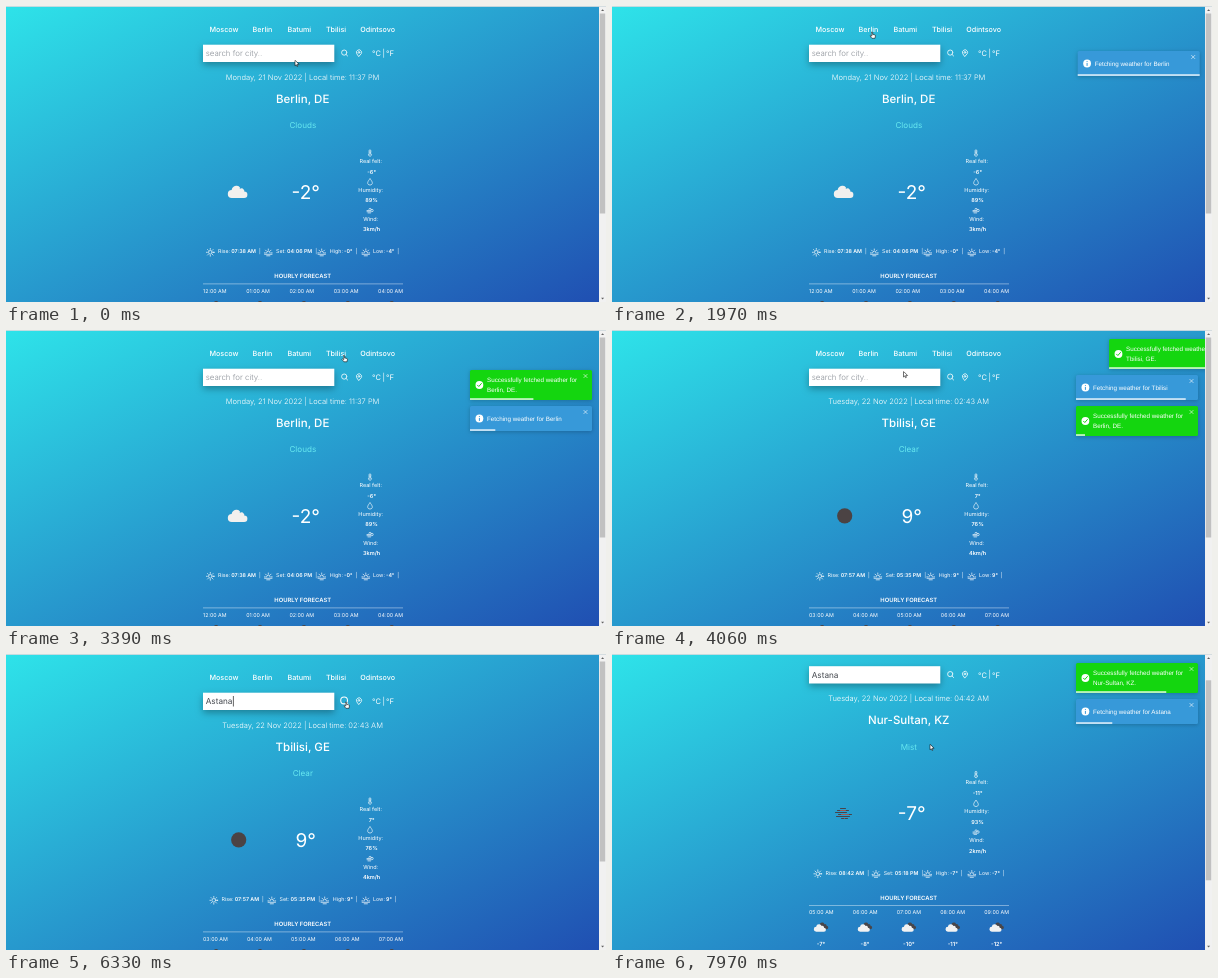
These frames come from a looping animation (600x296 px, 8000 ms). An HTML page with a canvas:

```html
<!DOCTYPE html>
<html lang="en">
<head>
<meta charset="utf-8">
<title>Weather app</title>
<style>
  html, body { margin: 0; width: 100%; height: 100%; overflow: hidden; background: #2798cd; }
  canvas { display: block; width: 600px; height: 296px; }
</style>
</head>
<body>
<canvas id="stage"></canvas>
<script>
const W = 600, H = 296, PAGE_W = 593, LOOP = 8000;
const canvas = document.getElementById('stage');
const ctx = canvas.getContext('2d');
const dpr = window.devicePixelRatio || 1;
canvas.width = W * dpr;
canvas.height = H * dpr;

const UI = 'Inter, "Open Sans", sans-serif';
const ARIAL = '"Liberation Sans", Arial, sans-serif';
const BAR_TIME = 1503, ENTER = 210, EXIT = 210;

const places = [
  { from: 0, icon: 'cloud', name: 'Berlin, DE', sky: 'Clouds', temp: '-2°',
    date: 'Monday, 21 Nov 2022 | Local time: 11:37 PM',
    details: ['-6°', '89%', '3km/h'],
    sun: ['07:38 AM', '04:06 PM', '-0°', '-4°'], shift: [0, 0, 0, 0],
    hours: ['12:00 AM', '01:00 AM', '02:00 AM', '03:00 AM', '04:00 AM'] },
  { from: 3965, icon: 'moon', name: 'Tbilisi, GE', sky: 'Clear', temp: '9°',
    date: 'Tuesday, 22 Nov 2022 | Local time: 02:43 AM',
    details: ['7°', '76%', '4km/h'],
    sun: ['07:57 AM', '05:35 PM', '9°', '9°'], shift: [3.5, 3.5, 3, 0],
    hours: ['03:00 AM', '04:00 AM', '05:00 AM', '06:00 AM', '07:00 AM'] },
  { from: 7065, icon: 'mist', name: 'Nur-Sultan, KZ', sky: 'Mist', temp: '-7°',
    date: 'Tuesday, 22 Nov 2022 | Local time: 04:42 AM',
    details: ['-11°', '93%', '2km/h'],
    sun: ['08:42 AM', '05:18 PM', '-7°', '-7°'], shift: [1.5, 1.7, 0, 0],
    hours: ['05:00 AM', '06:00 AM', '07:00 AM', '08:00 AM', '09:00 AM'] }
];
const hourTemps = ['-7°', '-8°', '-10°', '-11°', '-12°'];

const navs = [
  [['Moscow', 218], ['Berlin', 256.5], ['Batumi', 293.3], ['Tbilisi', 330], ['Odintsovo', 371.7]],
  [['Berlin', 212.6], ['Batumi', 246.8], ['Tbilisi', 282], ['Odintsovo', 321.7], ['Nur-Sultan', 371]]
];

// oldest first; bar is the moment the countdown begins
const toasts = [
  { start: 1809, bar: 2200, lines: ['Fetching weather for Berlin'] },
  { start: 1950, bar: 2669, lines: ['Successfully fetched weather for', 'Berlin, DE.'] },
  { start: 3375, bar: 3910, lines: ['Fetching weather for Tbilisi'] },
  { start: 3977, bar: 4490, lines: ['Successfully fetched weather for', 'Tbilisi, GE.'] },
  { start: 6440, bar: 6915, lines: ['Fetching weather for Astana'] },
  { start: 7080, bar: 7580, lines: ['Successfully fetched weather for', 'Nur-Sultan, KZ.'] }
];

// time, x, y, pointer shape from this point on
const pointer = [
  [0, 289, 54.5, 'arrow'], [120, 289, 54.5, 'arrow'], [480, 173, 46, 'arrow'],
  [880, 198, 33, 'arrow'], [1200, 240, 28, 'arrow'], [1400, 259.5, 26, 'hand'],
  [2610, 259.5, 26, 'hand'], [2760, 270, 28, 'arrow'], [3120, 325, 28, 'hand'],
  [3300, 337.5, 25.5, 'hand'], [3420, 337.5, 25.5, 'hand'], [3560, 318, 32, 'arrow'],
  [3950, 291.5, 41, 'arrow'], [4120, 291.5, 42, 'text'], [4550, 280, 49, 'text'],
  [4900, 315, 52, 'text'], [5430, 315, 52, 'text'], [5480, 317, 60, 'arrow'],
  [5660, 323, 96, 'arrow'], [5880, 330, 84, 'arrow'], [6240, 339.5, 48, 'hand'],
  [7600, 339.5, 48, 'hand'], [7640, 337, 56, 'arrow'], [7830, 318, 90.5, 'arrow'],
  [8000, 318, 90.5, 'arrow']
];

const clamp = v => Math.max(0, Math.min(1, v));
const easeOut = v => 1 - (1 - clamp(v)) ** 3;
const easeInOut = v => { v = clamp(v); return v * v * (3 - 2 * v); };
const mix = (a, b, v) => a + (b - a) * v;

function text(str, x, y, size, o = {}) {
  ctx.font = `${o.weight || 400} ${size}px ${o.font || UI}`;
  ctx.textAlign = o.align || 'center';
  ctx.fillStyle = o.color || '#fff';
  ctx.fillText(str, x, y + size * 0.36);
  return ctx.measureText(str).width;
}

function circle(x, y, r, fill) {
  ctx.beginPath();
  ctx.arc(x, y, r, 0, Math.PI * 2);
  if (fill) { ctx.fillStyle = fill; ctx.fill(); } else ctx.stroke();
}

function lines(...paths) {
  ctx.beginPath();
  for (const p of paths)
    for (let i = 0; i < p.length; i += 2) ctx[i ? 'lineTo' : 'moveTo'](p[i], p[i + 1]);
  ctx.stroke();
}

function pen(color, width) {
  ctx.strokeStyle = color;
  ctx.lineWidth = width;
  ctx.lineCap = ctx.lineJoin = 'round';
}

function at(x, y, scale, draw) {
  ctx.save();
  ctx.translate(x, y);
  ctx.scale(scale, scale);
  draw();
  ctx.restore();
}

function background() {
  // equal colour runs along the other diagonal
  const k = PAGE_W * H / (PAGE_W ** 2 + H ** 2);
  const dx = H * k, dy = PAGE_W * k, cx = PAGE_W / 2, cy = H / 2;
  const g = ctx.createLinearGradient(cx - dx, cy - dy, cx + dx, cy + dy);
  g.addColorStop(0, '#2ee3e9');
  g.addColorStop(1, '#204fb2');
  ctx.fillStyle = g;
  ctx.fillRect(0, 0, W, H);
}

function cloud(color) {
  ctx.fillStyle = color;
  ctx.beginPath();
  ctx.arc(-6, 2, 4, Math.PI / 2, Math.PI * 1.5);
  ctx.arc(-1.5, -1.5, 4.7, Math.PI * 1.05, Math.PI * 1.8);
  ctx.arc(3.6, -0.6, 3, Math.PI * 1.3, Math.PI * 1.95);
  ctx.arc(6.3, 2.7, 3.3, Math.PI * 1.5, Math.PI / 2);
  ctx.closePath();
  ctx.fill();
}

const skyIcons = {
  cloud: () => at(231.8, 186, 1, () => cloud('#f2f0ee')),
  moon: () => circle(232.7, 185.8, 7.6, '#4b4344'),
  mist: () => at(231.5, 186, 1, () => {
    const rows = [[-3, 2], [-6, 5], [-8, 3], [-5, 8], [-7, 6], [-2, 4]];
    rows.forEach(([a, b], i) => {
      const y = -5 + i * 2;
      pen('#48434a', 1);
      lines([a, y, b, y]);
      pen('#a85b55', 0.9);
      if (i % 2) lines([a + 3, y, b - 3, y]);
    });
  })
};

function searchIcon(hover) {
  at(338.5, 47, hover ? 1.3 : 1, () => {
    pen('#fff', 0.8);
    circle(-0.3, -0.4, 2.6);
    lines([1.6, 1.5, 3.1, 3]);
  });
}

function pinIcon() {
  at(353, 47, 1, () => {
    pen('#fff', 0.8);
    ctx.beginPath();
    ctx.arc(0, -0.6, 2.6, Math.PI * 0.85, Math.PI * 0.15);
    ctx.lineTo(0, 3.3);
    ctx.closePath();
    ctx.stroke();
    circle(0, -0.6, 0.9);
  });
}

function detailIcons() {
  pen('#fff', 0.65);
  at(364, 147, 1, () => {
    ctx.beginPath();
    ctx.arc(0, 1.7, 1.5, -Math.PI * 0.3, Math.PI * 1.3);
    ctx.lineTo(-0.9, -2.3);
    ctx.arc(0, -2.3, 0.9, Math.PI, 0);
    ctx.closePath();
    ctx.stroke();
    lines([0, -1.4, 0, 1.7]);
  });
  at(364, 176, 1, () => {
    ctx.beginPath();
    ctx.moveTo(0, -3.2);
    ctx.bezierCurveTo(4, 1, 2.2, 3, 0, 3);
    ctx.bezierCurveTo(-2.2, 3, -4, 1, 0, -3.2);
    ctx.stroke();
  });
  at(364, 205, 1, () => {
    ctx.beginPath();
    ctx.moveTo(-3, -0.5);
    ctx.lineTo(0, -0.5);
    ctx.arc(0, -1.6, 1.1, Math.PI / 2, -Math.PI, true);
    ctx.moveTo(-3, 0.7);
    ctx.lineTo(2, 0.7);
    ctx.arc(2, -0.5, 1.2, Math.PI / 2, -Math.PI, true);
    ctx.moveTo(-2, 1.9);
    ctx.lineTo(0.6, 1.9);
    ctx.stroke();
  });
}

function sunIcon(x, kind) {
  at(x, 246.3, 1, () => {
    pen('#fff', 0.7);
    const half = kind > 0, cy = half ? 0.6 : 0;
    ctx.beginPath();
    ctx.arc(0, cy, 1.8, half ? Math.PI : 0, Math.PI * 2);
    ctx.stroke();
    for (let i = half ? 4 : 0; i <= 8; i++) {
      const a = i * Math.PI / 4, c = Math.cos(a), s = Math.sin(a);
      lines([c * 2.9, cy + s * 2.9, c * 3.9, cy + s * 3.9]);
    }
    if (half) lines([-3.7, 2, 3.7, 2], [-1.6, 3.5, 1.6, 3.5]);
  });
}

function searchBox(t) {
  ctx.save();
  ctx.shadowColor = 'rgba(0,0,0,.3)';
  ctx.shadowBlur = 7 * dpr;
  ctx.shadowOffsetY = 3 * dpr;
  ctx.fillStyle = '#fff';
  ctx.fillRect(197, 38.7, 131.3, 17.3);
  ctx.restore();
  const typed = 'Astana'.slice(0, Math.max(0, Math.floor((t - 5045) / 47)));
  const w = typed
    ? text(typed, 199.7, 47.2, 8.2, { align: 'left', color: '#43474d' })
    : (text('search for city..', 199.7, 47.2, 7.9, { align: 'left', weight: 300, color: '#8d9299' }), 0);
  const typing = t > 5045 && t < 5400;
  if (t > 4620 && t < 6420 && (typing || (t - 5330 + 3180) % 318 < 160)) {
    ctx.fillStyle = '#222';
    ctx.fillRect(200.2 + w, 42, 0.7, 10.5);
  }
}

function sunRow(p) {
  const icons = [204.3, 262.3, 315.7, 359.8];
  const labels = [['Rise:', 212], ['Set:', 270], ['High:', 323.8], ['Low:', 367]];
  const values = [225.2, 281, 338, 380];
  p.sun.forEach((v, i) => {
    const dx = p.shift[i];
    sunIcon(icons[i] + dx, i);
    text(labels[i][0], labels[i][1] + dx, 245.5, 5.3, { align: 'left' });
    const w = text(v, values[i] + dx, 245.5, 5.3, { align: 'left', weight: 600 });
    text('|', values[i] + dx + w + 3, 245.5, 5.3, { align: 'left' });
  });
}

function hourly(p) {
  text('HOURLY FORECAST', 296.7, 270, 5.85, { weight: 600 });
  ctx.fillStyle = 'rgba(255,255,255,.5)';
  ctx.fillRect(197, 277.5, 200, 0.8);
  ctx.font = `400 5.3px ${UI}`;
  const widths = p.hours.map(h => ctx.measureText(h).width);
  const gap = (200 - widths.reduce((a, b) => a + b)) / 4;
  let x = 197;
  p.hours.forEach((h, i) => {
    text(h, x, 285, 5.3, { align: 'left' });
    x += widths[i] + gap;
    const cx = 209 + 43.9 * i;
    at(cx + 2, 298.5, 0.55, () => cloud('#48464a'));
    at(cx - 1, 300.5, 0.62, () => cloud('#f2f2f2'));
    text(hourTemps[i], cx, 316, 5.7, { weight: 600 });
  });
}

function page(t, scroll) {
  const p = places.filter(q => t >= q.from).pop();
  const icon = t >= 7065 && t < 7330 ? 'moon' : p.icon;
  ctx.save();
  ctx.translate(0, -scroll);
  for (const [name, x] of navs[t < 7065 ? 0 : 1]) text(name, x, 23.6, 7.2, { weight: 500 });
  searchBox(t);
  searchIcon(t > 6200 && t < 7620);
  pinIcon();
  text('°C', 370.5, 47.3, 7.6);
  text('|', 377.8, 47, 7.6);
  text('°F', 384, 47.3, 7.6);
  text(p.date, 296.6, 71, 7.5, { weight: 300 });
  text(p.name, 296.7, 92.5, 11.5, { weight: 500 });
  text(p.sky, 296.8, 119.3, 8.1, { color: '#67e8f0' });
  skyIcons[icon]();
  text(p.temp, 299.7, 186, 19);
  detailIcons();
  ['Real felt:', 'Humidity:', 'Wind:'].forEach((label, i) => {
    text(label, 364.7, 154.6 + 29 * i, 5.5);
    text(p.details[i], 365.6, 165.7 + 28.8 * i, 5.5, { weight: 600 });
  });
  sunRow(p);
  hourly(p);
  ctx.restore();
}

function toastShift(q, t) {
  const end = q.bar + BAR_TIME;
  if (t > end) {
    const v = (t - end) / EXIT;
    return v < 0.2 ? mix(0, -7.6, easeOut(v / 0.2)) : mix(-7.6, 760, easeInOut((v - 0.2) / 0.8));
  }
  const v = (t - q.start) / ENTER;
  const keys = [[0, 1140], [0.6, -9.5], [0.75, 3.8], [0.9, -1.9], [1, 0]];
  for (let i = 1; i < keys.length; i++) {
    const [a, from] = keys[i - 1], [b, to] = keys[i];
    if (v < b) return mix(from, to, easeOut((v - a) / (b - a)));
  }
  return 0;
}

function drawToast(q, x, y, h, t) {
  const ok = q.lines.length > 1, color = ok ? '#14d60f' : '#3799d9', w = 122;
  ctx.save();
  ctx.shadowColor = 'rgba(0,0,0,.22)';
  ctx.shadowBlur = 4 * dpr;
  ctx.shadowOffsetY = dpr;
  ctx.fillStyle = color;
  ctx.beginPath();
  ctx.roundRect(x, y, w, h, 1.5);
  ctx.fill();
  ctx.restore();

  const cy = y + h / 2;
  circle(x + 9.4, cy, 3.9, '#fff');
  pen(color, 1);
  if (ok) lines([x + 7.5, cy + 0.2, x + 8.8, cy + 1.5, x + 11.4, cy - 1.5]);
  else lines([x + 9.4, cy - 0.2, x + 9.4, cy + 2], [x + 9.4, cy - 2, x + 9.4, cy - 1.9]);
  q.lines.forEach((s, i) => {
    text(s, x + 17, ok ? y + 10.2 + 9.3 * i : cy, 6.25, { align: 'left', font: ARIAL });
  });
  pen('rgba(255,255,255,.85)', 0.7);
  const a = x + 115.5, b = y + 6;
  lines([a - 1.6, b - 1.6, a + 1.6, b + 1.6], [a + 1.6, b - 1.6, a - 1.6, b + 1.6]);
  ctx.fillStyle = 'rgba(255,255,255,.7)';
  ctx.fillRect(x, y + h - 1.9, w * (1 - clamp((t - q.bar) / BAR_TIME)), 1.9);
}

function notifications(t) {
  let y = 9;
  for (const q of [...toasts].reverse()) {
    if (t < q.start || t > q.bar + BAR_TIME + EXIT) continue;
    const h = q.lines.length > 1 ? 30 : 25;
    const x = 464 + toastShift(q, t);
    if (x < W) drawToast(q, x, y, h, t);
    y += h + 6;
  }
}

function triangle(x, y, dir) {
  ctx.fillStyle = '#606060';
  ctx.beginPath();
  ctx.moveTo(x - 1.5, y + dir * 0.8);
  ctx.lineTo(x + 1.5, y + dir * 0.8);
  ctx.lineTo(x, y - dir * 0.9);
  ctx.fill();
}

function browserEdges(scroll) {
  ctx.fillStyle = '#f1f1f1';
  ctx.fillRect(PAGE_W, 0, W - PAGE_W, H);
  ctx.fillStyle = '#c1c1c1';
  ctx.fillRect(PAGE_W + 0.8, 7.5 + scroll * 0.71, 5.4, 200);
  triangle(596.6, 4.2, 1);
  triangle(596.6, 292.5, -1);
  ctx.fillStyle = '#d3dcdf';
  ctx.fillRect(0, 0, W, 0.9);
}

function outlined(points) {
  ctx.beginPath();
  for (let i = 0; i < points.length; i += 2) ctx.lineTo(points[i], points[i + 1]);
  ctx.closePath();
  ctx.fillStyle = '#fff';
  ctx.fill();
  pen('#111', 0.6);
  ctx.stroke();
}

const shapes = {
  arrow: () => outlined([0, 0, 0, 5.3, 1.2, 4.2, 2, 6, 2.9, 5.6, 2.1, 3.9, 3.7, 3.8]),
  hand: () => outlined([0, 0.2, 0.8, 0, 1.2, 0.5, 1.2, 2.4, 3.6, 3, 4, 3.6, 3.5, 6.3,
    0.4, 6.3, -1.5, 3.9, -0.9, 3.3, 0, 3.9]),
  text: () => {
    pen('#333', 0.7);
    lines([0, -2.7, 0, 2.7], [-1.1, -3, 0, -2.7, 1.1, -3], [-1.1, 3, 0, 2.7, 1.1, 3]);
  }
};

function drawPointer(t) {
  let i = pointer.findIndex(k => k[0] > t) - 1;
  const [t0, x0, y0, kind] = pointer[i], [t1, x1, y1] = pointer[i + 1];
  const v = easeInOut((t - t0) / (t1 - t0));
  at(mix(x0, x1, v), mix(y0, y1, v), 1, shapes[kind]);
}

function draw(now) {
  const t = now % LOOP;
  const scroll = 26.5 * easeInOut((t - 7850) / 115);
  ctx.setTransform(dpr, 0, 0, dpr, 0, 0);
  ctx.textRendering = 'geometricPrecision';
  background();
  page(t, scroll);
  notifications(t);
  browserEdges(scroll);
  drawPointer(t);
}

const began = performance.now();
function tick() {
  draw(performance.now() - began);
  requestAnimationFrame(tick);
}
tick();
</script>
</body>
</html>
```
